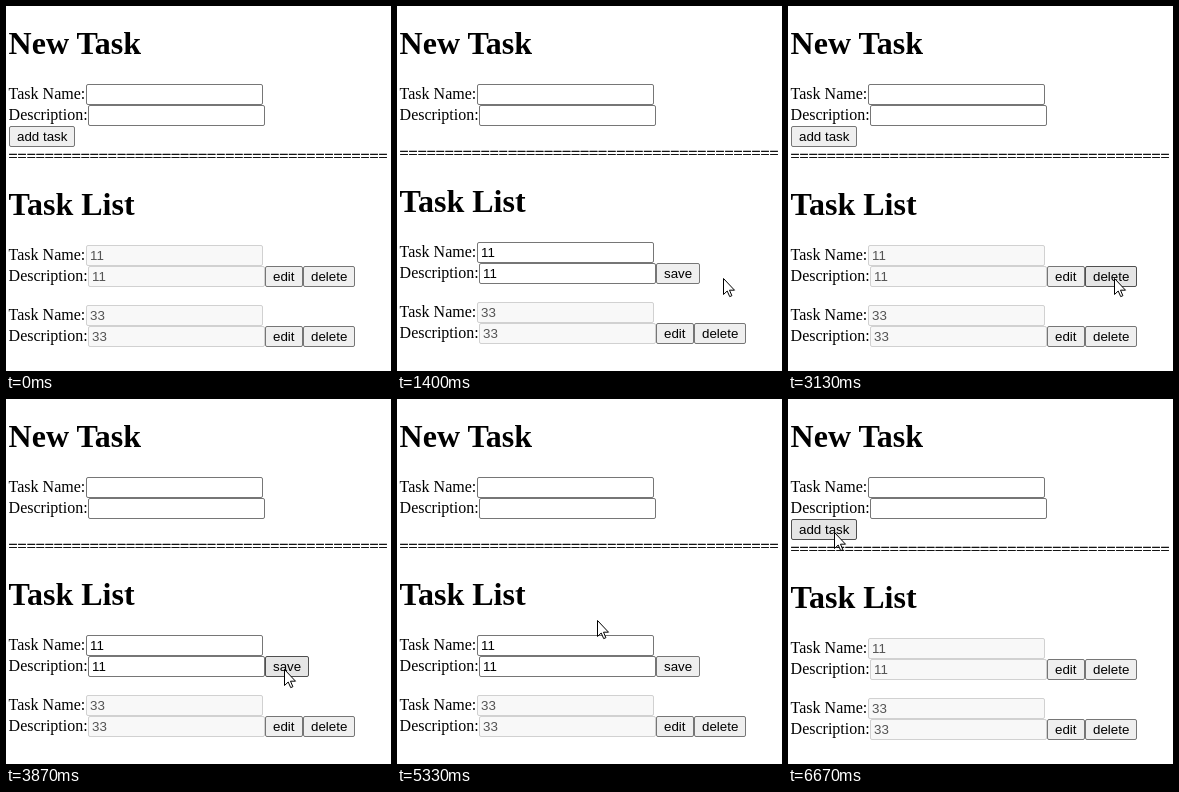
Recreate the animation shown at these times as an HTML page. Size 385 by 365 pixels, loop 7.99 s.

```html
<!DOCTYPE html>
<html lang="en">
<head>
<meta charset="utf-8">
<title>Task list</title>
<style>
  html, body { margin: 0; width: 100%; height: 100%; overflow: hidden; background: #fff; }
  svg { display: block; width: 385px; height: 365px; }
  text { font: 16px "Liberation Serif", "Times New Roman", serif; white-space: pre; }
  .title { font-size: 32px; font-weight: bold; }
  .rule { stroke: #000; stroke-width: .4; }
  .ui { font: 13.333px "Liberation Sans", Arial, sans-serif; }
</style>
</head>
<body>
<svg id="stage" viewBox="0 0 385 365"></svg>
<script>
const stage = document.getElementById('stage');
const LOOP = 7990, TICK = 200 / 3;
const ROW = 21, LINE = 18, LEFT = 2.6;

// places the pointer visits
const enter = [361, 324], edit = [279, 271], save = [290, 266], saveLeft = [282, 268],
      del = [327, 272], rule = [56, 143], add = [46, 133];

// glides: first tick, last tick, destination
const glides = [
  [1, 9, edit], [14, 22, del], [25, 33, save], [33, 41, del], [46, 54, edit],
  [57, 68, rule], [68, 70, add], [73, 85, saveLeft], [87, 96, rule], [97, 100, add]
];
const presses = [14, 33, 57, 86];

const ease = u => u * u * u * (u * (6 * u - 15) + 10);
const clamp = u => Math.max(0, Math.min(1, u));

// every second press saves, the others open the task for editing
const isEditing = n => presses.filter((t, i) => n >= t + (i % 2 ? 1 : 1)).length % 2 === 1;

function pointerAt(n) {
  if (n < glides[0][0]) return null;
  let [x, y] = enter;
  for (const [from, to, [tx, ty]] of glides) {
    const k = ease(clamp((n - from) / (to - from)));
    x += (tx - x) * k;
    y += (ty - y) * k;
  }
  return { x: Math.round(x), y: Math.round(y) };
}

function scene(n) {
  const p = pointerAt(n), editing = isEditing(n), pressed = presses.includes(n);
  let out = '', beam = false;

  const over = (x, y, w, h) => p && p.x >= x && p.x < x + w && p.y >= y && p.y < y + h;
  const text = (x, y, s, cls = '', fill = '#000') =>
    `<text x="${x}" y="${y}" class="${cls}" fill="${fill}">${s}</text>`;
  const box = (x, y, w, fill, line) =>
    `<rect x="${x + .5}" y="${y + .5}" width="${w - 1}" height="${ROW - 1}" rx="1.5" fill="${fill}" stroke="${line}"/>`;

  function label(y, s, w, h, cls) {
    out += text(LEFT, y, s, cls);
    if (over(LEFT, y - h * .8, w, h)) beam = true;
  }
  function input(x, y, value, on) {
    const w = 177;
    out += on ? box(x, y, w, '#fff', '#767676') : box(x, y, w, '#f8f8f8', '#d1d1d1');
    out += text(x + 4, y + 15, value, 'ui', on ? '#000' : '#545454');
    if (on && over(x, y, w, ROW)) beam = true;
  }
  function button(x, y, w, s) {
    const hot = over(x, y, w, ROW);
    const [fill, line] = !hot ? ['#efefef', '#767676']
      : pressed ? ['#f5f5f5', '#8d8d8d'] : ['#e5e5e5', '#4f4f4f'];
    out += box(x, y, w, fill, line) + text(x + 8, y + 15, s, 'ui');
  }
  function fields(y, value, on) {
    label(y + 15, 'Task Name:', 77, LINE);
    input(80, y, value, on);
    label(y + ROW + 15, 'Description:', 79, LINE);
    input(82, y + ROW, value, on);
  }
  function task(y, value, on) {
    fields(y, value, on);
    if (on) return button(259, y + ROW, 44, 'save');
    button(259, y + ROW, 38, 'edit');
    button(297, y + ROW, 52, 'delete');
  }

  // without its button the third row shrinks to a plain text line
  const dy = editing ? LINE - ROW : 0;
  label(48, 'New Task', 133, 36, 'title');
  fields(78, '', true);
  if (!editing) button(3, 120, 66, 'add task');
  label(156 + dy, '='.repeat(42), 379, LINE, 'rule');
  label(209 + dy, 'Task List', 126, 36, 'title');
  ['11', '33'].forEach((value, i) =>
    task(239 + dy + i * (2 * ROW + LINE), value, editing && i === 0));

  if (p) {
    const at = `transform="translate(${p.x} ${p.y})"`;
    out += beam
      ? `<path ${at} d="M-3 -7.5H0M1 -7.5H4M.5 -7V7M-3 7.5H0M1 7.5H4" fill="none" stroke="#000"/>`
      : `<path ${at} d="M.5 .5V16.5L4.2 13L6.7 18.6L8.9 17.7L6.5 12.2H11.5Z" fill="#fff" stroke="#000"/>`;
  }
  return out;
}

let last = -1;
function frame() {
  const n = Math.floor((performance.now() % LOOP + 4) / TICK);
  if (n !== last) stage.innerHTML = scene(last = n);
  requestAnimationFrame(frame);
}
frame();
</script>
</body>
</html>
```
